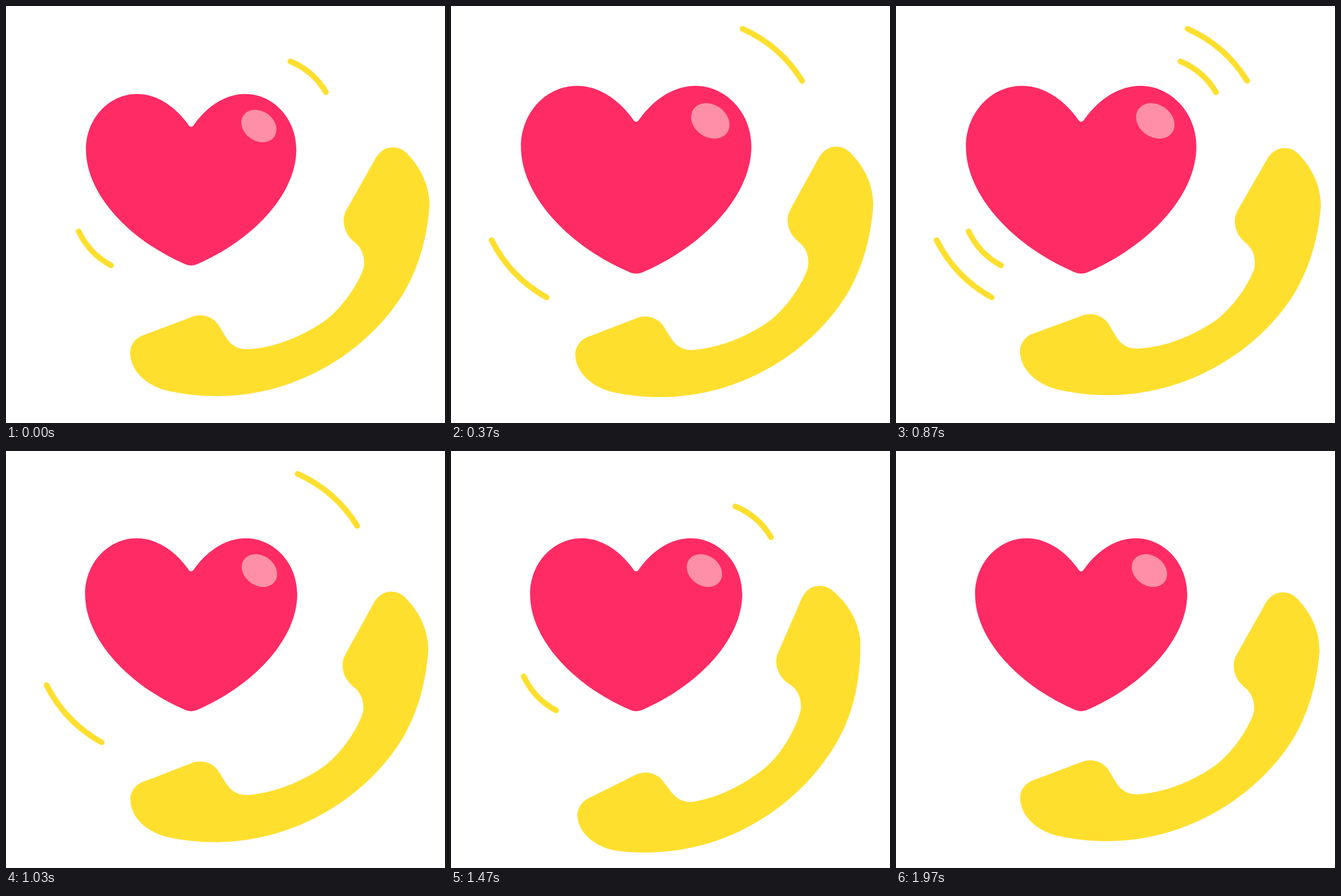
An HTML page that plays this animation: 767x730 px, repeating every 2000 ms.

```html
<!DOCTYPE html>
<html lang="en">
<head>
<meta charset="utf-8">
<title>Love call</title>
<style>
  html, body { margin: 0; height: 100%; overflow: hidden; background: #fff; }
  svg { display: block; width: 100vw; height: 100vh; }
  .waves { fill: none; stroke: #ffdf2e; stroke-width: 10; stroke-linecap: round; }
</style>
</head>
<body>
<svg viewBox="0 0 767 730">
  <g id="heart">
    <path fill="#ff2b65" d="M330 197C357 160 392 139.500 427 139.500C481 139.500 525 187 525 246
      C525 334 438 422 335.500 466C328 469.500 319 469.500 311.500 466
      C209 422 122 334 122 246C122 187 166 139.500 220 139.500C255 139.500 290 160 317 197
      C321 204.500 326 204.500 330 197Z"/>
    <ellipse fill="#ff8fa8" rx="36" ry="28.500" transform="translate(453.200 201) rotate(35)"/>
  </g>
  <path id="inner" class="waves" d="M497 97A130 130 0 0 1 559 151M127 394.500A130 130 0 0 0 183.500 454"/>
  <path id="outer" class="waves" d="M509.500 40A235 235 0 0 1 613.500 131M71 410A235 235 0 0 0 167 510"/>
  <path id="phone" fill="#ffdf2e" d="M646 266C654 253 664 247.500 676 247.500C688 247.500 697 253 706 264
    C728 289 740 318 740 350C736 400 724 452 695 502C633 604 508 683 369 683
    C340 683 310 680 280 673C245 664 217 638 217 607C217 593 226 582 238 577
    L327 543.500C345 538 362 545 371 558L385 581C394 595 407 602 423 601
    C468 598 515 580 556 552C583 532 612 494 624 461C628 447 625 428 612 416
    C600 407 590 394 590 376C590 368 592 362 596 355Z"/>
</svg>
<script>
  const [heart, inner, outer, phone] =
    ['heart', 'inner', 'outer', 'phone'].map(id => document.getElementById(id));

  const LOOP = 2000, STEPS = 60, BEAT = 15, RING = 20;
  // [step, degrees] of one ring, followed by a rest
  const swing = [[0, 0], [2.5, -8.3], [7.5, 3], [12.5, -1.5], [15, 0], [RING, 0]];

  const ease = p => p * p * (3 - 2 * p);

  function swingAt(step) {
    const i = swing.findIndex(key => key[0] > step);
    const [t0, a0] = swing[i - 1], [t1, a1] = swing[i];
    return a0 + (a1 - a0) * ease((step - t0) / (t1 - t0));
  }

  function show(el, on) {
    el.setAttribute('visibility', on ? 'visible' : 'hidden');
  }

  function draw(ms) {
    // 30 steps a second; the offset absorbs rounding to 10 ms
    const step = Math.floor(ms % LOOP * STEPS / LOOP + 0.15) % STEPS;
    const ring = step % RING;
    const beat = 1 - Math.abs(step % BEAT / BEAT * 2 - 1);
    const scale = 0.912 + 0.158 * ease(beat);

    heart.setAttribute('transform',
      `translate(323.5 304) scale(${scale}) translate(-323.5 -304)`);
    phone.setAttribute('transform', `rotate(${swingAt(ring)} 548 585)`);
    show(inner, ring < 10);
    show(outer, ring >= 5 && ring < 15);
  }

  const start = performance.now();
  function tick() {
    draw(performance.now() - start);
    requestAnimationFrame(tick);
  }
  tick();
</script>
</body>
</html>
```
